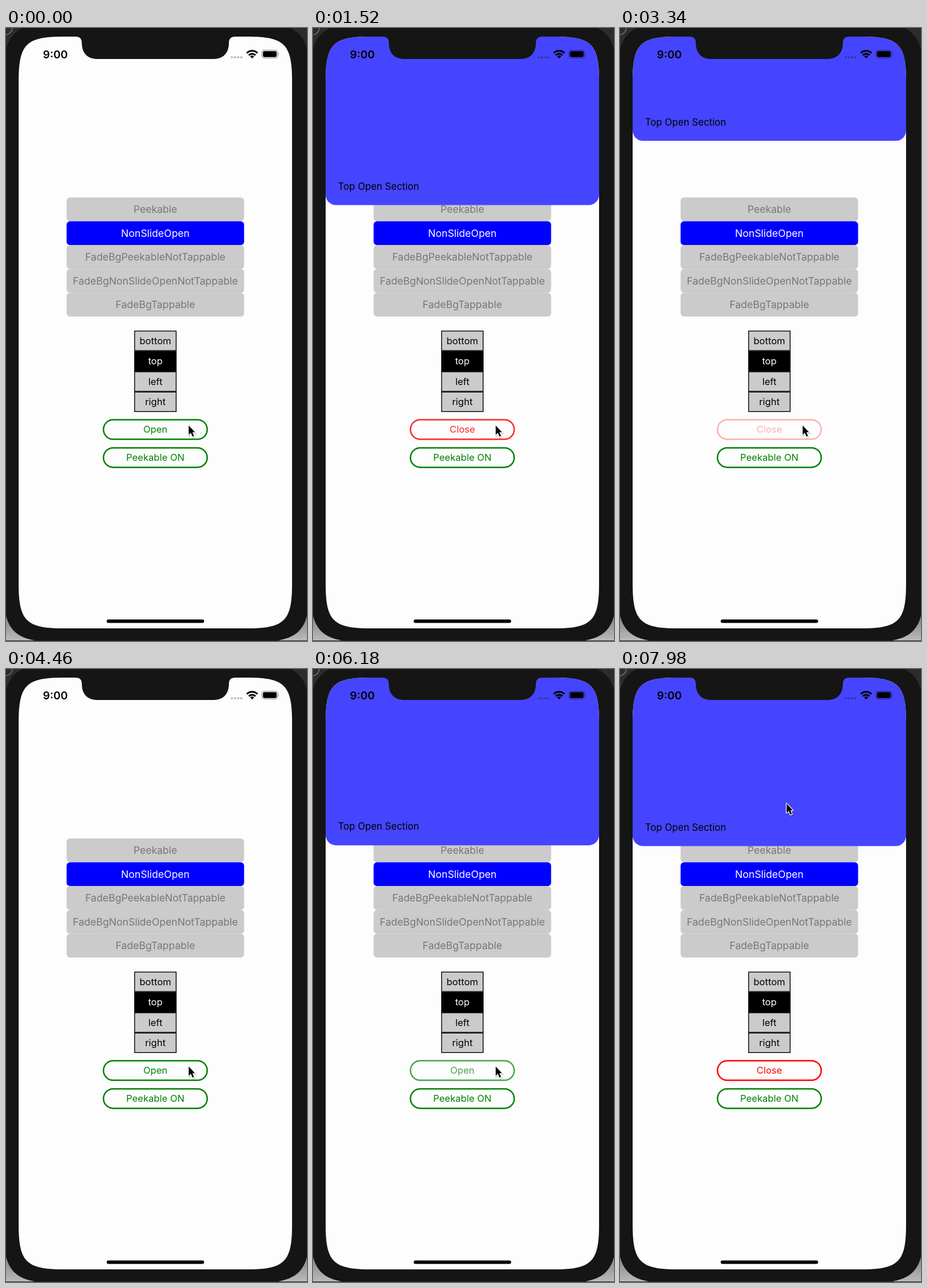
An HTML page that plays this animation: 524 px wide and 1068 px high, repeating every 8 s.

```html
<!DOCTYPE html>
<html lang="en">
<head>
<meta charset="utf-8">
<title>Sliding top section</title>
<style>
  html, body { margin: 0; width: 100%; height: 100%; overflow: hidden; background: #2c2c2c; }
  svg { display: block; width: 524px; height: 1068px; }
  text { font: 16.5px Inter, "Liberation Sans", sans-serif; text-anchor: middle; }

  .option rect { fill: #cbcbcb; }
  .option text { font-size: 17.5px; fill: #777; }
  .option.on rect { fill: #00f; }
  .option.on text { fill: #fff; }

  .side rect { fill: #cbcbcb; stroke: #000; stroke-width: 1.4; }
  .side.on rect { fill: #000; }
  .side.on text { fill: #fff; }

  .pill rect { fill: none; stroke: currentColor; stroke-width: 2.5; }
  .pill text { fill: currentColor; }
  .green { color: #008000; }
  .red { color: #f00; }

  .panel, .press, .show-open, .show-close, .ring, .cursor { animation: 8s infinite; }
  .panel, .press { animation-timing-function: cubic-bezier(.455, .03, .515, .955); }
  .show-open, .show-close, .ring { animation-timing-function: step-end; }
  .panel { animation-name: slide; }
  .press { animation-name: press; }
  .show-open { animation-name: open-label; }
  .show-close { animation-name: close-label; }
  .ring { animation-name: click; }
  .cursor { animation-name: point; animation-timing-function: ease-in-out; }

  @keyframes slide {
    0%, 16.85%, 42.84%, 75.45% { transform: translateY(-294px); }
    18.725%, 40.965%, 77.325%, 100% { transform: translateY(0); }
  }
  @keyframes press {
    0%, 13.725%, 19.975%, 37.85%, 44.08%, 72.375%, 78.6%, 100% { opacity: 1; }
    15.6%, 16.85%, 39.725%, 40.965%, 74.25%, 75.45% { opacity: .2; }
  }
  @keyframes open-label {
    0%, 42.84% { visibility: visible; }
    18.725%, 77.325%, 100% { visibility: hidden; }
  }
  @keyframes close-label {
    0%, 42.84% { visibility: hidden; }
    18.725%, 77.325%, 100% { visibility: visible; }
  }
  @keyframes click {
    0%, 14.225%, 38.35%, 72.875%, 100% { visibility: hidden; }
    12.6%, 36.725%, 71.25% { visibility: visible; }
  }
  @keyframes point {
    0%, 86.25% { transform: translate(317px, 690px); }
    96.25%, 100% { transform: translate(289px, 232px); }
  }
</style>
</head>
<body>
<svg viewBox="0 0 524 1068">
  <defs>
    <linearGradient id="desk" x2="0" y2="1">
      <stop offset="0" stop-color="#666"/>
      <stop offset="1" stop-color="#bbb"/>
    </linearGradient>
    <clipPath id="screen">
      <path d="M22 93C22 28 35 15 100 15H420C485 15 498 28 498 93V968C498 1033 485 1046 420 1046H100C35 1046 22 1033 22 968Z"/>
    </clipPath>
  </defs>

  <!-- desktop and phone body -->
  <rect width="524" height="1068" fill="#2c2c2c"/>
  <rect y="1000" width="524" height="68" fill="url(#desk)"/>
  <path d="M0 12Q10 10 11 0" fill="none" stroke="#777" stroke-width="1.5"/>
  <path d="M-5 91C-5 9 13 -9 95 -9H429C511 -9 529 9 529 91V970C529 1052 511 1070 429 1070H95C13 1070 -5 1052 -5 970Z" fill="#151515"/>
  <path d="M0 1067.5H524" stroke="#222"/>

  <g clip-path="url(#screen)">
    <rect x="22" y="15" width="476" height="1031" fill="#fdfdfe"/>

    <g class="option"><rect x="105.5" y="295.2" width="309" height="41.5" rx="6"/><text x="260" y="322">Peekable</text></g>
    <g class="option on"><rect x="105.5" y="336.7" width="309" height="41.5" rx="6"/><text x="260" y="363.6">NonSlideOpen</text></g>
    <g class="option"><rect x="105.5" y="378.2" width="309" height="41.5" rx="6"/><text x="260" y="405.1">FadeBgPeekableNotTappable</text></g>
    <g class="option"><rect x="105.5" y="419.7" width="309" height="41.5" rx="6"/><text x="260" y="446.6">FadeBgNonSlideOpenNotTappable</text></g>
    <g class="option"><rect x="105.5" y="461.2" width="309" height="41.5" rx="6"/><text x="260" y="488.1">FadeBgTappable</text></g>

    <g class="side"><rect x="223.9" y="528" width="72.3" height="34"/><text x="260" y="551">bottom</text></g>
    <g class="side on"><rect x="223.9" y="563.4" width="72.3" height="34.6"/><text x="260" y="586.4">top</text></g>
    <g class="side"><rect x="223.9" y="599" width="72.3" height="34"/><text x="260" y="621.8">left</text></g>
    <g class="side"><rect x="223.9" y="634.3" width="72.3" height="34"/><text x="260" y="657.2">right</text></g>

    <g class="press">
      <g class="pill green show-open"><rect x="169.7" y="682.5" width="180.6" height="34" rx="17"/><text x="260" y="705">Open</text></g>
      <g class="pill red show-close"><rect x="169.7" y="682.5" width="180.6" height="34" rx="17"/><text x="260" y="705">Close</text></g>
    </g>
    <g class="pill green"><rect x="169.7" y="731.4" width="180.6" height="34" rx="17"/><text x="260" y="754">Peekable ON</text></g>

    <g class="panel">
      <rect x="22" y="-40" width="476" height="348.5" rx="18" fill="#4545ff"/>
      <text x="43.6" y="281.8" style="text-anchor: start; font-size: 16.7px">Top Open Section</text>
    </g>

    <rect x="175.3" y="1030.4" width="169.6" height="6" rx="3"/>
  </g>

  <!-- notch and status bar -->
  <path d="M121 13V15Q132 15 132 26C132 44 142 54 160 54H360C378 54 388 44 388 26Q388 15 399 15V13Z" fill="#151515"/>
  <text x="86" y="52.5" style="font-size: 19px; font-weight: 600">9:00</text>
  <g opacity=".25">
    <circle cx="393.3" cy="51" r="2.1"/><circle cx="398.7" cy="51" r="2.1"/>
    <circle cx="404.1" cy="51" r="2.1"/><circle cx="409.5" cy="51" r="2.1"/>
  </g>
  <g fill="none" stroke="#000" stroke-width="3">
    <path d="M419.2 43.6A13.2 13.2 0 0 1 437.8 43.6"/>
    <path d="M422.6 47.4A8.2 8.2 0 0 1 434.4 47.4"/>
  </g>
  <path d="M428.5 53L425 49.5A5 5 0 0 1 432 49.5Z"/>
  <g opacity=".4">
    <rect x="445.5" y="38.5" width="27.5" height="14" rx="4" fill="none" stroke="#000" stroke-width="1.2"/>
    <path d="M474.4 43.2Q476.4 45.5 474.4 47.8Z"/>
  </g>
  <rect x="447.3" y="40.3" width="23.9" height="10.4" rx="2.4"/>

  <!-- pointer -->
  <g class="ring" fill="none">
    <circle cx="316.5" cy="692.5" r="29" stroke="#fff" stroke-width="4"/>
    <circle cx="316.5" cy="692.5" r="29" stroke="#000" stroke-width="2"/>
  </g>
  <g class="cursor">
    <path d="M1 2.5V18.7L4.8 15.2L7.6 21.8L10.3 20.6L7.5 14.2H12Z" transform="translate(1 2)" stroke="#000" stroke-width="3" opacity=".15"/>
    <path d="M1 2.5V18.7L4.8 15.2L7.6 21.8L10.3 20.6L7.5 14.2H12Z" stroke="#fff" stroke-width="2.4" stroke-linejoin="round" paint-order="stroke"/>
  </g>
</svg>
</body>
</html>
```
